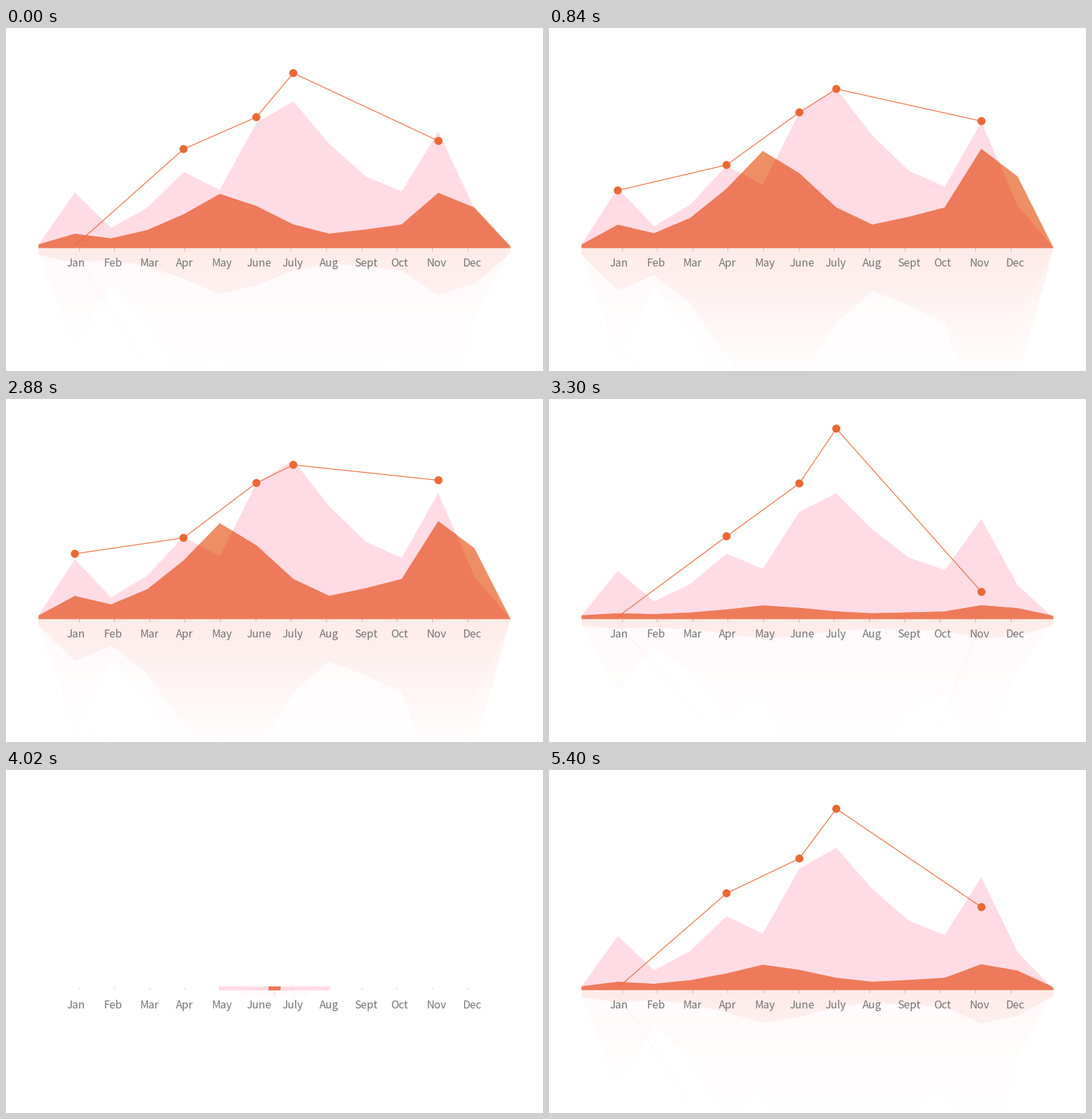
Recreate the animation shown at these times as a matplotlib script. Size 800 px wide and 512 px high, loop 5430 ms.

```python
import matplotlib.pyplot as plt
import numpy as np
from matplotlib.animation import FuncAnimation
from matplotlib.patches import Circle, Polygon

W, H, DPI = 800, 512, 100
PX = 72 / DPI
FRAMES, INTERVAL = 181, 30
FLOOR, TOP, LINE_BASE = 328.5, 323, 325
MIRROR = 1.84

PINK = "#ffdbe5"
ORANGE = "#ed8e65"
ORANGE_ON_PINK = "#ed7a5a"
ACCENT = "#eb6836"
TICK = "#f3a5ae"
TEXT = "#757373"

MONTHS = {"Jan": 104.5, "Feb": 159, "Mar": 213.5, "Apr": 266, "May": 321.5,
          "June": 376.5, "July": 427, "Aug": 481, "Sept": 536, "Oct": 586,
          "Nov": 641.5, "Dec": 694}
AREA_X = np.array([48.5, 102.5, 156.5, 210.5, 264.5, 318.5, 373, 428,
                   481.5, 536, 589.5, 644, 698, 751.5])
PINK_Y = np.array([323, 239, 296.2, 263.5, 205.5, 234.7, 126, 91,
                   160, 213, 237, 140, 265.5, 328])
ORANGE_Y = np.array([323.3, 293.7, 306.5, 283.5, 240, 183.5, 217, 268,
                     293.5, 282, 268, 180.5, 221.5, 328])
# x, final y and start step of each point on the line
POINTS = [(102.5, 240.3, 153), (264.5, 205, 143), (373, 126, 133),
          (428, 91, 139), (644.3, 140, 147)]
LINE_START = 133

_s = np.linspace(0, 1, 600)
STEEP_X = 3 * .95 * _s * (1 - _s)**2 + 3 * .05 * _s**2 * (1 - _s) + _s**3
STEEP_Y = _s**2 * (3 - 2 * _s)


def progress(step, start, length):
    return min(max((step - start) / length, 0), 1)


def cubic(p):
    return 4 * p**3 if p < .5 else 1 - 4 * (1 - p)**3


def steep(p):
    return np.interp(p, STEEP_X, STEEP_Y)


def elastic(p):
    if p in (0, 1):
        return p
    return 1 + 2**(-10 * p) * np.sin((p - .125) * 4 * np.pi)


def area(final_y, width, growth):
    x = W / 2 + (AREA_X - W / 2) * width
    y = TOP + (final_y - TOP) * growth
    outline = np.column_stack([x, y])
    return np.vstack([outline, [x[-1], FLOOR], [x[0], FLOOR]])


def pink_area(step):
    return area(PINK_Y, cubic(progress(step, 121, 18)),
                steep(progress(step, 133, 27.5)))


def orange_area(step):
    return area(ORANGE_Y, cubic(progress(step, 125.4, 14.2)),
                steep(progress(step, 138.7, 24.5)))


def line_points(step):
    return np.array([(x, LINE_BASE + (y - LINE_BASE)
                      * elastic(progress(step, start, 40)))
                     for x, y, start in POINTS])


def mirrored(xy):
    return np.column_stack([xy[:, 0], FLOOR + (FLOOR - xy[:, 1]) * MIRROR])


fig = plt.figure(figsize=(W / DPI, H / DPI), dpi=DPI, facecolor="white")
ax = fig.add_axes([0, 0, 1, 1])
ax.axis("off")


def add_area(color, z, alpha=1):
    return ax.add_patch(Polygon(np.zeros((3, 2)), facecolor=color, lw=0,
                                alpha=alpha, zorder=z))


def add_line(color, width, z, alpha=1):
    return ax.plot([], [], color=color, lw=width * PX, alpha=alpha, zorder=z,
                   solid_capstyle="butt", solid_joinstyle="round")[0]


pink_mirror = add_area(PINK, 1, .12)
orange_mirror = add_area(ORANGE_ON_PINK, 1.1, .11)
line_mirror = add_line(ACCENT, 1.5, 1.2, .08)

# white veil that fades the reflection out toward the bottom
veil = np.ones((184, 1, 4))
veil[..., 3] = np.linspace(0, .95, 184)[:, None]
ax.imshow(veil, extent=[0, W, H, 328], aspect="auto", zorder=2,
          interpolation="bilinear")

pink = add_area(PINK, 3)
ticks = [add_line(TICK, 1, 4) for _ in range(12)]
orange = add_area(ORANGE, 5)
overlap = add_area(ORANGE_ON_PINK, 6)
line = add_line(ACCENT, 1.15, 7)
dots = [ax.add_patch(Circle((x, y), 6, facecolor=ACCENT, lw=0, zorder=8))
        for x, y, _ in POINTS]

for name, x in MONTHS.items():
    ax.text(x, 356, name, family="Noto Sans CJK JP", size=16 * PX, color=TEXT,
            ha="center", va="baseline", zorder=9)

ax.set_xlim(0, W)
ax.set_ylim(H, 0)


def draw(frame):
    # 25 poses per 30 frames; the exit is the entrance run backwards
    pose = frame * 5 // 6
    step = max(pose, min(pose + 151, 239 - pose))

    pink.set_xy(pink_area(step))
    orange.set_xy(orange_area(step))
    overlap.set_xy(orange_area(step))
    overlap.set_clip_path(pink)

    # the reflection trails by one pose
    pink_mirror.set_xy(mirrored(pink_area(step - 1)))
    orange_mirror.set_xy(mirrored(orange_area(step - 1)))
    line_mirror.set_data(*mirrored(line_points(step - 1)).T)
    line_mirror.set_visible(step - 1 > LINE_START)

    points = line_points(step)
    line.set_data(*points.T)
    line.set_visible(step > LINE_START)
    for dot, point, (_, _, start) in zip(dots, points, POINTS):
        dot.center = tuple(point)
        dot.set_visible(step > start)

    half = 6.5 * cubic(progress(step, 124.5, 11))
    for i, tick in enumerate(ticks):
        x = 108.5 + 52.65 * i
        tick.set_data([x, x], [326.3 - half, 326.3 + half])
    return []


anim = FuncAnimation(fig, draw, frames=FRAMES, interval=INTERVAL,
                     repeat=True, repeat_delay=0, blit=False)
plt.show()
```
